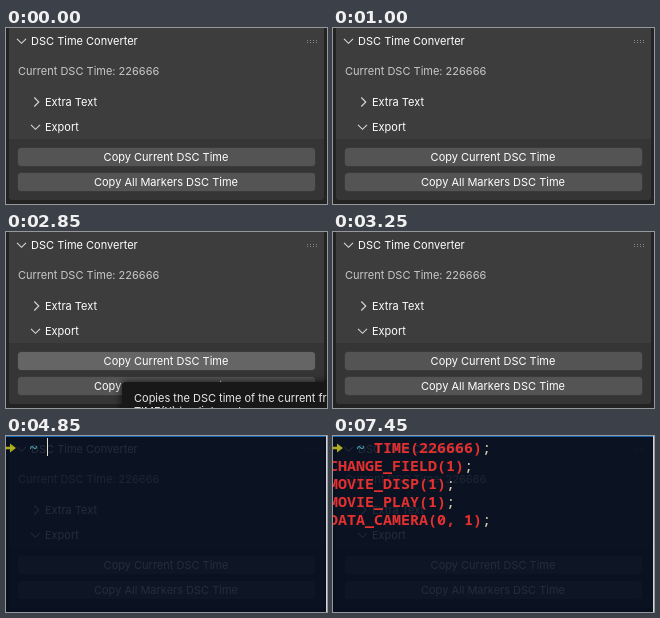
An HTML page with a canvas that plays this animation: 321x176 px, repeating every 9850 ms.

```html
<!DOCTYPE html>
<html lang="en">
<head>
<meta charset="utf-8">
<title>DSC Time Converter</title>
<style>
html, body { margin: 0; width: 100%; height: 100%; overflow: hidden; background: #232323; }
canvas { display: block; }
</style>
</head>
<body>
<canvas id="stage" width="321" height="176"></canvas>
<script>
const g = document.getElementById('stage').getContext('2d');
const LOOP = 9850, W = 321, H = 176;
const UI = '11px Inter, sans-serif', MONO = '15px "Noto Sans Mono", monospace', BOLD = 'bold ' + MONO;
const CELL = 9, LINE = 18, LEFT = -4;
const pasted = ['TIME(226666);', 'CHANGE_FIELD(1);', 'MOVIE_DISP(1);', 'MOVIE_PLAY(1);', 'DATA_CAMERA(0, 1);'];

function rect(x, y, w, h, color) {
  g.fillStyle = color;
  g.fillRect(x, y, w, h);
}

function box(x, y, w, h, r, color) {
  g.fillStyle = color;
  g.beginPath();
  g.roundRect(x, y, w, h, r);
  g.fill();
}

function text(s, x, y, color, font = UI, align = 'left') {
  g.font = font;
  g.textAlign = align;
  g.fillStyle = color;
  g.fillText(s, x, y);
}

function chevron(x, y, open) {
  g.save();
  g.translate(x, y);
  if (!open) g.rotate(-Math.PI / 2);
  g.strokeStyle = '#d8d8d8';
  g.lineWidth = 1.1;
  g.beginPath();
  g.moveTo(-4.5, -2.2);
  g.lineTo(0, 2.3);
  g.lineTo(4.5, -2.2);
  g.stroke();
  g.restore();
}

function button(label, y, hover) {
  box(11.5, y - 0.5, 298, 19, 4, '#404040');
  box(12, y, 297, 18, 3.5, hover ? '#656565' : '#545454');
  text(label, 160, y + 13, '#fff', UI, 'center');
}

function panel(hover) {
  rect(0, 0, W, H, '#232323');
  box(3, -6, 315, 178, 4, '#3d3d3d');
  box(3, 111, 315, 61, [0, 0, 4, 4], '#353535');
  chevron(15.5, 13, true);
  text('DSC Time Converter', 25, 17, '#fff');
  for (let i = 0; i < 8; i++) rect(301 + i % 4 * 3, i < 4 ? 12 : 14, 1, 1, '#858585');
  text('Current DSC Time: 226666', 12, 47, '#c8c8c8');
  chevron(30.5, 74, false);
  text('Extra Text', 39, 78, '#fff');
  chevron(29.5, 99, true);
  text('Export', 39, 103, '#fff');
  button('Copy Current DSC Time', 120, hover === 1);
  button('Copy All Markers DSC Time', 145, hover === 2);
}

function tooltip(alpha) {
  g.save();
  g.globalAlpha = alpha;
  g.shadowColor = '#000b';
  g.shadowBlur = 8;
  box(116, 150, 230, 50, 4, '#181818');
  g.shadowColor = 'transparent';
  text('Copies the DSC time of the current frame', 128, 170, '#e8e8e8');
  text('TIME(X) to clipboard', 128, 183, '#e8e8e8');
  g.restore();
}

function prompt() {
  g.fillStyle = '#b0ad1c';
  g.beginPath();
  [[0, 10.8], [4, 10.8], [4, 7.5], [10, 12], [4, 16.5], [4, 13.2], [0, 13.2]].forEach(p => g.lineTo(...p));
  g.fill();
  text('~', LEFT + 3 * CELL, 17, '#4e9eb0', BOLD);
}

function paste(selected) {
  const font = selected ? MONO : BOLD;
  pasted.forEach((s, i) => {
    const x = i ? LEFT : LEFT + 5 * CELL, y = 2 + i * LINE;
    if (selected) rect(x, y, s.length * CELL, LINE, '#ecdab2');
    const body = s.slice(0, -1);
    text(body, x, y + 15, selected ? '#10141c' : '#e4302f', font);
    text(';', x + body.length * CELL, y + 15, selected ? '#10141c' : '#e3d6b4', MONO);
  });
}

function terminal(t) {
  const fade = Math.min(1, (t - 4050) / 200);
  g.globalAlpha = 0.79 + 0.08 * fade;
  rect(0, 0, W, H, '#040d20');
  g.globalAlpha = 1;
  rect(0, 0, W, 1, fade < 0.25 ? '#a9aaa6' : '#1463b0');
  rect(320, 0, 1, H, fade < 0.25 ? '#6b6b6b' : '#d4d6d8');
  prompt();
  if (t >= 5250) paste(t < 7450);
  else if (t < 4650 || t >= 4850) rect(41, 2, 1, 18, '#e6dfca');
}

function hovered(t) {
  if (t >= 800 && t < 850) return 2;
  if (t >= 850 && t < 950) return 1;
  return t >= 1850 && t < 3250 ? 1 : 0;
}

function draw(now) {
  const t = Math.floor(now % LOOP / 50) * 50;
  panel(hovered(t));
  if (t >= 2850 && t < 2950) tooltip(t < 2900 ? 1 : 0.5);
  if (t >= 4050) terminal(t);
}

const start = performance.now();
function tick() {
  draw(performance.now() - start);
  requestAnimationFrame(tick);
}
tick();
</script>
</body>
</html>
```
